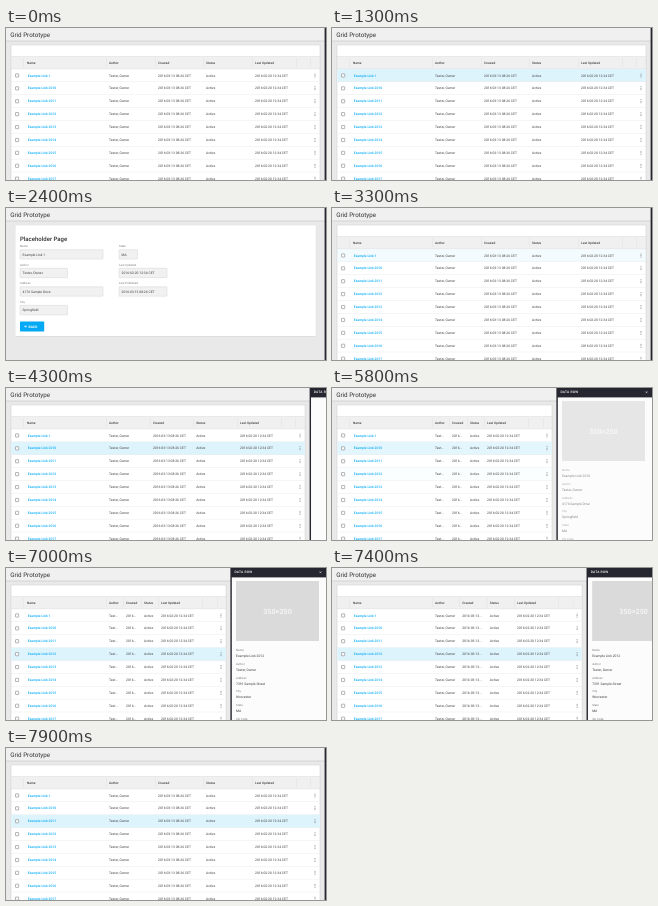
Write an HTML page that moves like this. It is 320x152 px and loops after 8000 ms.

```html
<!DOCTYPE html>
<html lang="en">
<head>
<meta charset="utf-8">
<title>Grid Prototype</title>
<style>
  html, body { margin: 0; width: 100%; height: 100%; overflow: hidden; background: #e9e9e9; }
  svg { display: block; width: 100%; height: 100%; }
  text { font-family: Roboto, Arial, sans-serif; text-rendering: geometricPrecision; white-space: pre; }
</style>
</head>
<body>
<svg id="stage" viewBox="0 0 320 152"></svg>
<script>
const LOOP = 8000;
const ROW_TOP = 41, ROW_HEIGHT = 12.9, ROW_COUNT = 9;
const BLUE = '#03a9f4', INK = '#3c3c3c', LABEL = '#777', DARK = '#25262f';
const OWNER = 'Tester, Owner';
const CREATED = '2016-03-13 08:26 CET', UPDATED = '2016-02-20 12:34 CET';
const stage = document.getElementById('stage');

function add(parent, tag, attrs = {}, content = '') {
  const node = document.createElementNS('http://www.w3.org/2000/svg', tag);
  for (const key in attrs) node.setAttribute(key, attrs[key]);
  node.textContent = content;
  parent.appendChild(node);
  return node;
}
const group = parent => add(parent, 'g');
const rect = (parent, x, y, width, height, fill, extra) =>
  add(parent, 'rect', { x, y, width, height, fill, ...extra });
const text = (parent, x, y, content, size = 3.35, fill = INK, extra) =>
  add(parent, 'text', { x, y, 'font-size': size, fill, ...extra }, content);
const bold = { 'font-weight': 500 };

const clamp = v => Math.max(0, Math.min(1, v));
const ease = v => v * v * (3 - 2 * v);
const ramp = (t, from, to) => ease(clamp((t - from) / (to - from)));
const pulse = (t, a, b, c, d) => ramp(t, a, b) * (1 - ramp(t, c, d));
const mix = (a, b, k) => a + (b - a) * k;
const show = (node, opacity) => {
  node.setAttribute('opacity', opacity);
  node.setAttribute('visibility', opacity > 0 ? 'visible' : 'hidden');
};

function shorten(content, width) {
  const room = Math.floor((width - 5) / 1.65);
  return content.length <= room ? content : content.slice(0, Math.max(1, room - 3)) + '...';
}

// Page chrome
rect(stage, 0, 0, 320, 152, '#e9e9e9');
const grid = group(stage);
const page = group(stage);
rect(stage, 0, 0, 320, 12.7, '#f0f0f0');
rect(stage, 0, 12.7, 320, .7, '#c9c9c9');
rect(stage, 0, 13.4, 320, .6, '#dedede');
text(stage, 4.2, 8.6, 'Grid Prototype', 6.25, '#333');
const panel = group(stage);

// Grid
const card = rect(grid, 5, 17, 309, 140, '#fff', { stroke: '#d4d4d4', 'stroke-width': .6 });
const head = rect(grid, 5, 28.2, 309, 12.7, '#f0f0f0', { stroke: '#dcdcdc', 'stroke-width': .5 });
const edges = [100, 149, 197, 246, 290, 304.5];
const narrowEdges = [100, 117, 135, 152, 196.5, 211];
const columns = [
  { title: 'Author', value: OWNER },
  { title: 'Created', value: CREATED },
  { title: 'Status', value: 'Active' },
  { title: 'Last Updated', value: UPDATED }
];
const separators = edges.map(() => rect(grid, 0, 30, .4, 9, '#dcdcdc'));
rect(grid, 17, 30, .4, 9, '#dcdcdc');
text(grid, 21, 35.7, 'Name', 3.2, INK, bold);
columns.forEach(c => { c.heading = text(grid, 0, 35.7, c.title, 3.2, INK, bold); });

const rows = Array.from({ length: ROW_COUNT }, (_, i) => {
  const top = ROW_TOP + i * ROW_HEIGHT, mid = top + ROW_HEIGHT / 2;
  const glow = rect(grid, 5.2, top, 308.6, ROW_HEIGHT, '#def4fd');
  const line = rect(grid, 5.2, top + ROW_HEIGHT - .4, 308.6, .4, '#e6e6e6');
  rect(grid, 9.5, mid - 1.6, 3.2, 3.2, '#fff', { stroke: '#777', 'stroke-width': .55, rx: .4 });
  text(grid, 21.8, mid + 1.1, 'Example Link ' + (i ? 2009 + i : 1), 3.35, BLUE, bold);
  const cells = columns.map(() => text(grid, 0, mid + 1.1, ''));
  const menu = group(grid);
  [-1.5, 0, 1.5].forEach(d => add(menu, 'circle', { cx: 0, cy: mid + d, r: .48, fill: '#555' }));
  return { glow, line, cells, menu };
});

// Detail page
rect(page, 0, 13, 320, 139, '#e9e9e9');
rect(page, 9, 18, 301.2, 110.7, '#dcdcdc', { rx: .8 });
rect(page, 9.4, 17.6, 300.4, 110.4, '#fff', { rx: .6 });
text(page, 14, 32.5, 'Placeholder Page', 6, '#333', bold);
[
  [14, 0, 83, 'Name', 'Example Link 1'],
  [113, 0, 18.5, 'State', 'MA'],
  [14, 1, 47.5, 'Author', OWNER],
  [113, 1, 48, 'Last Updated', UPDATED],
  [14, 2, 83, 'Address', '4176 Sample Drive'],
  [113, 2, 48, 'Last Published', CREATED],
  [14, 3, 47.5, 'City', 'Springfield']
].forEach(([x, line, width, label, value]) => {
  const y = 41.7 + line * 18.55;
  text(page, x, y - 2.6, label, 2.9, LABEL);
  rect(page, x, y, width, 9.4, '#f1f1f1', { stroke: '#d5d5d5', 'stroke-width': .5, rx: .5 });
  text(page, x + 2.6, y + 5.9, value);
});
const button = rect(page, 14, 113.6, 24.2, 9.8, BLUE, { rx: .7 });
add(page, 'path', { d: 'M21 118.5h-2.4m1.1-1.1l-1.1 1.1l1.1 1.1', stroke: '#fff', 'stroke-width': .6, fill: 'none' });
text(page, 22.6, 119.7, 'BACK', 3.4, '#fff', { 'font-weight': 700 });

// Side panel; its dark edge stays in view while it is closed
rect(panel, 225, 0, 97, 152, '#fcfcfc');
rect(panel, 224.4, 0, 1.4, 152, DARK);
rect(panel, 225, 0, 97, 9.4, DARK);
text(panel, 228.5, 5.4, 'DATA ROW', 3.3, '#fff', { ...bold, 'letter-spacing': .2 });
add(panel, 'path', { d: 'M313.6 3.4l1.8 1.8m0-1.8l-1.8 1.8', stroke: '#fff', 'stroke-width': .5 });
const details = group(panel);
rect(details, 230, 13, 83, 60, '#dadada');
text(details, 271.5, 46.2, '350×250', 7.2, '#f4f4f4', { 'font-weight': 700, 'text-anchor': 'middle' });
const fields = ['Name', 'Author', 'Address', 'City', 'State', 'Zip Code'].map((label, i) => {
  const y = 83.2 + i * 13.72;
  text(details, 230, y, label, 2.9, LABEL);
  return text(details, 230, y + 6.1, '');
});
const records = [
  ['Example Link 2010', OWNER, '4176 Sample Drive', 'Springfield', 'MA', '01103'],
  ['Example Link 2012', OWNER, '7391 Sample Street', 'Worcester', 'MA', '01608']
];

function layout(k) {
  const width = mix(309, 215, k);
  card.setAttribute('width', width);
  head.setAttribute('width', width);
  const xs = edges.map((x, i) => mix(x, narrowEdges[i], k));
  separators.forEach((s, i) => s.setAttribute('x', xs[i]));
  columns.forEach((c, i) => c.heading.setAttribute('x', xs[i] + 3));
  rows.forEach(row => {
    row.glow.setAttribute('width', width - .4);
    row.line.setAttribute('width', width - .4);
    row.menu.setAttribute('transform', `translate(${mix(309, 215, k)} 0)`);
    row.cells.forEach((cell, i) => {
      cell.setAttribute('x', xs[i] + 3);
      cell.textContent = shorten(columns[i].value, xs[i + 1] - xs[i]);
    });
  });
}

function render(t) {
  const open = pulse(t, 4200, 4600, 7250, 7650);
  layout(open);

  const glow = Array(ROW_COUNT).fill(0);
  glow[0] = pulse(t, 850, 1100, 2950, 3550);
  glow[1] = pulse(t, 3950, 4200, 5750, 5950);
  glow[2] = ramp(t, 7550, 7800);
  glow[3] = pulse(t, 5750, 5950, 7450, 7700);
  rows.forEach((row, i) => show(row.glow, glow[i]));

  show(page, pulse(t, 1350, 1700, 2700, 3050));
  button.setAttribute('fill', t > 2550 ? '#0398db' : BLUE);

  panel.setAttribute('transform', `translate(${mix(94.2, 0, open)} 0)`);
  const swap = 1 - .5 * pulse(t, 5700, 5850, 5850, 6000);
  show(details, ramp(t, 4685, 4810) * swap);
  const record = records[t < 5850 ? 0 : 1];
  fields.forEach((field, i) => { field.textContent = record[i]; });
}

const start = performance.now();
function tick() {
  render((performance.now() - start) % LOOP);
  requestAnimationFrame(tick);
}
tick();
</script>
</body>
</html>
```
